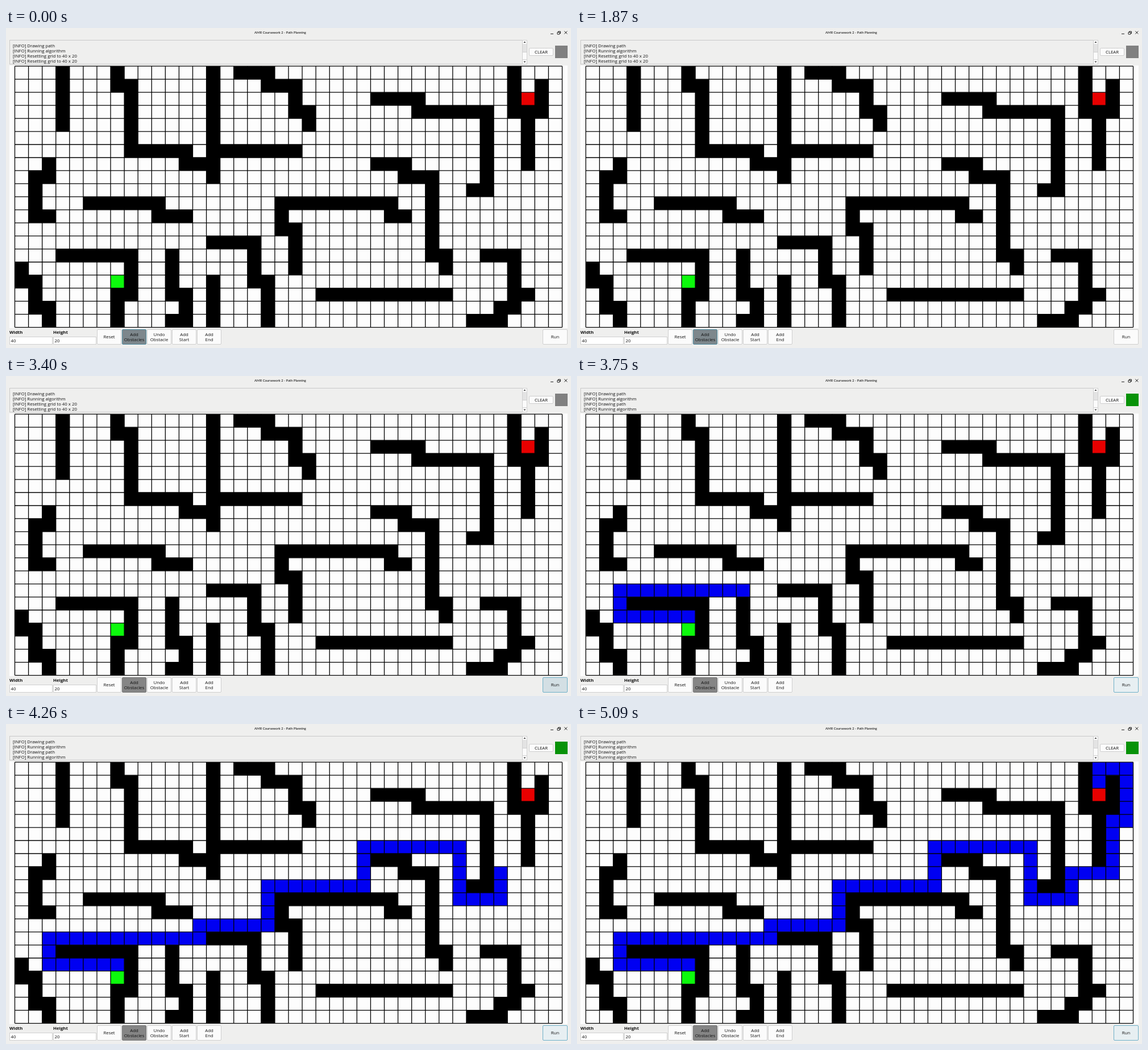
Write an HTML page that moves like this. It is 994 px wide and 563 px high and loops after 6.82 s.

```html
<!DOCTYPE html>
<html lang="en">
<head>
<meta charset="utf-8">
<title>Path Planning</title>
<style>
  html, body { margin: 0; width: 100%; height: 100%; overflow: hidden; background: #efefee; }
  svg { display: block; width: 994px; height: 563px; }
  text { font: 7.8px "Open Sans", "Noto Sans", sans-serif; fill: #111; }
  .title { font: 5.85px Lato, sans-serif; fill: #000; }
  .label { font-weight: 700; }
  .mid { text-anchor: middle; }
  .btn rect { fill: #fbfbfb; stroke: #cfcfcf; }
  .btn.checked rect { fill: #858585; stroke: #757575; }
  .btn.checked.focus rect { fill: #7d878c; stroke: #4f8ba0; }
  .btn.hover rect { fill: #e7eff2; stroke: #6fb0c8; }
  .btn.down rect { fill: #d3dfe4; stroke: #6fb0c8; }
  .cells { fill: none; stroke-linecap: square; }
</style>
</head>
<body>
<svg viewBox="0 0 994 563">
  <text class="title mid" x="482.5" y="10">AMR Coursework 2 - Path Planning</text>
  <path d="M958 10.3h5M970 7.5h4v3.5h-4zM971.5 7.5v-1.500h4v3.500h-1.500M982.300 5.500l5 5m0 -5l-5 5" fill="none" stroke="#222"/>

  <rect x="6.500" y="21.500" width="910" height="42" fill="#efefee" stroke="#c9c9c9"/>
  <g id="log"></g>
  <rect x="908.500" y="21.500" width="8" height="42" fill="#fbfbfb" stroke="#d0d0d0"/>
  <path d="M909 28h7v14h-7z" fill="#e3e3e3"/>
  <path d="M909 42.500h7M909 55.500h7" stroke="#cfcfcf"/>
  <path d="M910.500 26l2 -2.500l2 2.500zM910.500 58.500l2 2.500l2 -2.500z" fill="#444"/>
  <rect id="status" x="966" y="31" width="22" height="22"/>

  <rect x="6" y="66" width="982" height="462" fill="#fdfdfd"/>
  <g transform="translate(15.500 67.200) scale(24.075 22.970)">
    <g class="cells" transform="translate(.5 .5)">
      <path stroke="#000" d="M3 0v4M7 0v1h1v5h4v1h2M14 0v8M14 6h6M16 0h2v1h2v2h1v1
        M26 2h3v1h5v6h-1M36 0v3h2v-2M37 3v4M2 7v1h-1v3h1M26 7h2v1h2v6h1v1
        M5 10h5v1h2M28 11h-1v-1h-8v2h1v3M14 13h3v3h1v3M3 14h5v3h-1v2
        M0 15v1h1v2h1v1M11 14v3h1v2h-1M14 16v3M22 17h9M34 14h2v3h1M36 17v1h-1v1h-2"/>
      <path id="route" stroke="#0000f2"
        d="M7 15h-5v-2h11v-1h5v-3h7v-3h7v4h3v-2h3v-4h1v-4h-2v1"/>
    </g>
    <path d="M7 16h1v1h-1z" fill="#0cfa0c"/>
    <path d="M37 2h1v1h-1z" fill="#e80000"/>
    <path id="grid" stroke="#000" stroke-width="1.3" vector-effect="non-scaling-stroke"/>
  </g>

  <g id="controls"></g>
</svg>
<script>
const LOOP = 6820, PRESS = 3400, RESULT = 3500, STEP = 31.6, MIDWAY = 3750;
// Screen refreshes relative to MIDWAY, and route cells painted by then
const PROGRESS = [[-7, 0], [0, 17], [6, 32], [16, 54], [23, 69]];
const OLD_LOG = ["Drawing path", "Running algorithm", "Resetting grid to 40 x 20", "Resetting grid to 40 x 20"];
const NEW_LOG = ["Drawing path", "Running algorithm", "Drawing path", "Running algorithm"];

const $ = id => document.getElementById(id);
const text = (x, y, s, cls = "") => `<text x="${x}" y="${y}" class="${cls}">${s}</text>`;

function button(id, x, y, w, h, ...lines) {
  const first = y + h / 2 + 2.8 - (lines.length - 1) * 4.5;
  return `<g id="${id}" class="btn"><rect x="${x + .5}" y="${y + .5}" width="${w - 1}" height="${h - 1}" rx="1.5"/>` +
    lines.map((s, i) => text(x + w / 2, first + i * 9, s, "mid")).join("") + "</g>";
}

function field(x, label, value) {
  return text(x, 538, label, "label") +
    `<rect x="${x + .5}" y="543.5" width="75" height="13" fill="#fff" stroke="#cfcfcf"/>` +
    text(x + 2.5, 553, value);
}

$("controls").innerHTML =
  field(6, "Width", 40) + field(83, "Height", 20) +
  button("reset", 160, 530, 43, 27, "Reset") +
  button("obstacles", 204, 530, 43, 27, "Add", "Obstacles") +
  button("undo", 248, 530, 43, 27, "Undo", "Obstacle") +
  button("start", 292, 530, 43, 27, "Add", "Start") +
  button("end", 336, 530, 43, 27, "Add", "End") +
  button("run", 944, 530, 44, 27, "Run") +
  button("clear", 920, 35, 43, 14, "CLEAR");

let lines = "";
for (let x = 0; x <= 40; x++) lines += `M${x} 0v20`;
for (let y = 0; y <= 20; y++) lines += `M0 ${y}h40`;
$("grid").setAttribute("d", lines);

function paintedCells(t) {
  const n = Math.floor((t - MIDWAY) / STEP + .01);
  if (n < PROGRESS[0][0]) return 0;
  const i = PROGRESS.findIndex(([end]) => n < end);
  if (i < 0) return 69;
  const [n0, c0] = PROGRESS[i - 1], [n1, c1] = PROGRESS[i];
  return Math.floor(c0 + (c1 - c0) * (n - n0) / (n1 - n0));
}

let shownLog;
function draw(now) {
  const t = now % LOOP, pressed = t >= PRESS, done = t >= RESULT;
  const log = done ? NEW_LOG : OLD_LOG;
  if (log !== shownLog) {
    $("log").innerHTML = log.map((s, i) => text(12, 33.7 + i * 9.1, "[INFO] " + s)).join("");
    shownLog = log;
  }
  $("status").setAttribute("fill", done ? "#089208" : "#808080");
  $("obstacles").setAttribute("class", "btn checked" + (pressed ? "" : " focus"));
  $("run").setAttribute("class", "btn" + (done ? " hover" : pressed ? " down" : ""));

  const cells = paintedCells(t);
  $("route").setAttribute("visibility", cells ? "visible" : "hidden");
  $("route").setAttribute("stroke-dasharray", `${Math.max(0, cells - 1)} 99`);
  requestAnimationFrame(() => draw(performance.now()));
}
draw(performance.now());
</script>
</body>
</html>
```
